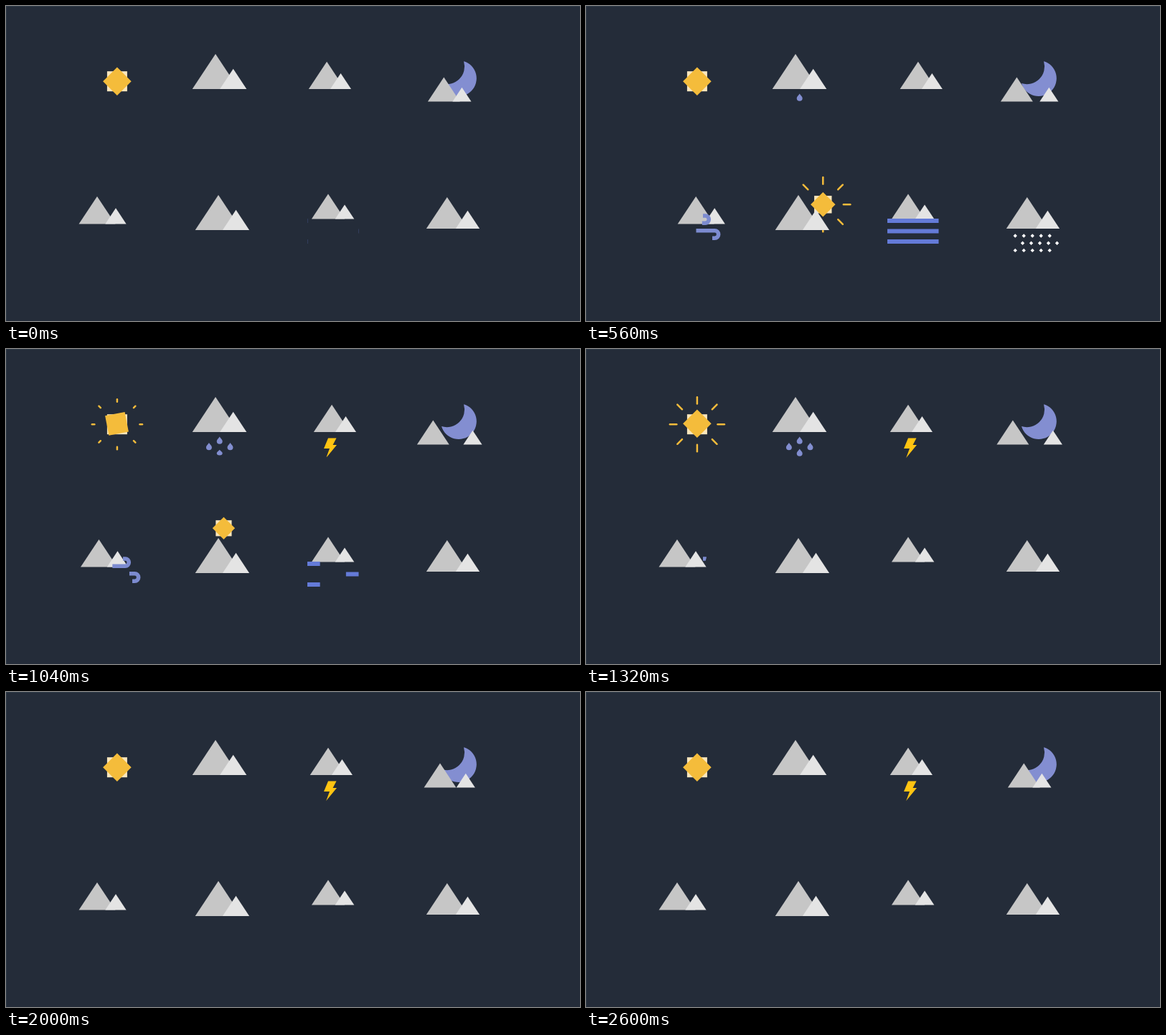
An HTML page with a canvas for the animation above (2640 ms loop, 800 by 440 pixels).

```html
<!DOCTYPE html>
<html lang="en">
<head>
<meta charset="utf-8">
<title>Weather icons</title>
<style>
  html, body { margin: 0; width: 100%; height: 100%; overflow: hidden; background: #242c39; }
  canvas { display: block; }
</style>
</head>
<body>
<canvas id="stage" width="800" height="440"></canvas>
<script>
const ctx = document.getElementById('stage').getContext('2d');
const LOOP = 2640;
const YELLOW = '#f4bc3b', CREAM = '#fbe7bd', BLUE = '#828ed0', FOG = '#647bd8';
const ROCK = '#c6c6c6', SNOWCAP = '#e4e4e4';

const ramp = (t, from, to) => Math.min(1, Math.max(0, (t - from) / (to - from)));
const smooth = u => u * u * (3 - 2 * u);
// Rises from 0 to 1, holds, then falls back to 0
const pulse = (t, rise, top, fall, end) => ramp(t, rise, top) - ramp(t, fall, end);
const bezier = (u, a, b, c) => (1 - u) ** 2 * a + 2 * u * (1 - u) * b + u * u * c;

function polygon(color, ...points) {
  ctx.fillStyle = color;
  ctx.beginPath();
  for (let i = 0; i < points.length; i += 2) ctx.lineTo(points[i], points[i + 1]);
  ctx.fill();
}

function peak(color, x, base, height) {
  const half = height * 0.66;
  polygon(color, x - half, base, x, base - height, x + half, base);
}

function mountains(x, base, height, gap) {
  peak(ROCK, x, base, height);
  peak(SNOWCAP, x + gap, base, height * 0.575);
}

function square(color, half) {
  ctx.fillStyle = color;
  ctx.fillRect(-half, -half, half * 2, half * 2);
}

function sun(x, y, half, turn, rays) {
  ctx.save();
  ctx.translate(x, y);
  square(CREAM, half);
  if (rays > 0) {
    ctx.strokeStyle = YELLOW;
    ctx.lineWidth = 2.5;
    ctx.lineCap = 'round';
    for (let i = 0; i < 8; i++) {
      const middle = 33.3 + i % 2;
      ctx.beginPath();
      ctx.moveTo(middle - 4.7 * rays, 0);
      ctx.lineTo(middle + 4.7 * rays, 0);
      ctx.stroke();
      ctx.rotate(Math.PI / 4);
    }
  }
  // The diamond turns about a point slightly above its centre
  ctx.translate(0, -0.5);
  ctx.rotate(turn * Math.PI);
  ctx.translate(0, 0.5);
  ctx.rotate(Math.PI / 4);
  square(YELLOW, half);
  ctx.restore();
}

function clearDay(t) {
  const rays = pulse(t, 960, 1180, 1720, 1960) + pulse(t, 2020, 2260, 2320, 2560);
  sun(154.9, 105.2, 14, pulse(t, 600, 1240, 1400, 1960), rays);
}

function drop(x, y, scale) {
  if (scale <= 0) return;
  ctx.save();
  ctx.translate(x, y);
  ctx.scale(1, scale);
  ctx.fillStyle = BLUE;
  ctx.fill(new Path2D('M0 -5C1.5 -2.5 4 -1 4 1.2A4 4 0 0 1 -4 1.2C-4 -1 -1.5 -2.5 0 -5'));
  ctx.restore();
}

function rain(t) {
  mountains(292, 116, 49, 24.7);
  [[0, -1], [-1, 0], [1, 0], [0, 1]].forEach(([dx, dy], i) => {
    const start = 440 + i * 170, end = 1720 + i * 50;
    drop(297.7 + dx * 14.8, 136 + dy * 8.5, pulse(t, start, start + 120, end, end + 100));
  });
}

function thunder(t) {
  mountains(447 + 22.5 * ramp(t, 0, 200) - 20.5 * ramp(t, 200, 1320), 116, 38.3, 19.4);
  ctx.save();
  ctx.beginPath();
  ctx.rect(440, 124, 24, 29 * ramp(t, 600, 1080));
  ctx.clip();
  polygon('#ffc412', 449, 124.5, 460.5, 124.5, 455.5, 134, 461, 134, 446.2, 152, 451, 139, 443, 139);
  ctx.restore();
}

function night(t) {
  ctx.fillStyle = '#838ed1';
  ctx.fill(new Path2D('M638 77.2A24.9 24.9 0 1 1 607 108A24.7 24.7 0 0 0 638 77.2'));
  const out = Math.sin(ramp(t, 0, 1300) * Math.PI / 2);
  const back = (1 - ramp(t, 1300, 2600)) ** 1.4;
  const spread = 15.8 * out * back;
  peak(ROCK, 610.3 - spread, 133.5, 34);
  peak(SNOWCAP, 635.4 + spread, 133.5, 19.8);
}

function gust(path, shown) {
  if (shown <= 0) return;
  const length = 46;
  ctx.save();
  ctx.strokeStyle = '#7c8bd0';
  ctx.lineWidth = 5.6;
  ctx.setLineDash([length * shown, length * 2]);
  ctx.stroke(new Path2D(path));
  ctx.restore();
}

function wind(t) {
  const shift = 26.2 * (smooth(ramp(t, 0, 290)) - smooth(ramp(t, 790, 1100)));
  mountains(127 + shift, 304.5, 38.6, 26);
  gust('M163 293H166.2A5.1 5.1 0 0 1 166.2 303.2H140', pulse(t, 420, 700, 960, 1360));
  gust('M176 324.2H179.4A5.25 5.25 0 0 0 179.4 313.7H153.5', pulse(t, 250, 530, 900, 1240));
}

function sunrise(t) {
  const u = pulse(t, 0, 480, 920, 1140);
  const x = bezier(u, 296, 297, 330.3), y = bezier(u, 295, 212, 277.3);
  if (u > 0) sun(x, y, 10.2 + 2 * u, 0, pulse(t, 450, 555, 850, 930));
  mountains(296, 313, 49, 24.5);
}

function fog(t) {
  mountains(449, 297.5, 35, 23);
  const width = 71.5 * pulse(t, 0, 320, 800, 1120);
  ctx.fillStyle = FOG;
  for (let row = 0; row < 3; row++) {
    const x = row === 1 ? 491.5 - width : 420;
    ctx.fillRect(x, 297 + row * 14.5, width, 6);
  }
}

function snow(t) {
  mountains(614.8, 311, 44, 28.6);
  for (let row = 0; row < 3; row++) {
    const start = 40 + row * 120, end = 580 + row * 120;
    ctx.globalAlpha = pulse(t, start, start + 160, end, end + 180);
    for (let i = 0; i < 5; i++) {
      const x = 598.2 + i * 12 + (row === 1 ? 10.3 : 0), y = 321 + row * 10.2;
      polygon('#fff', x - 2.7, y, x, y - 2.7, x + 2.7, y, x, y + 2.7);
    }
  }
  ctx.globalAlpha = 1;
}

const icons = [clearDay, rain, thunder, night, wind, sunrise, fog, snow];

function draw() {
  const t = performance.now() % LOOP;
  ctx.fillStyle = '#2e3a47';
  ctx.fillRect(0, 0, 800, 440);
  ctx.fillStyle = '#242c39';
  ctx.fillRect(1, 1, 799, 439);
  icons.forEach(icon => icon(t));
  requestAnimationFrame(draw);
}
draw();
</script>
</body>
</html>
```
